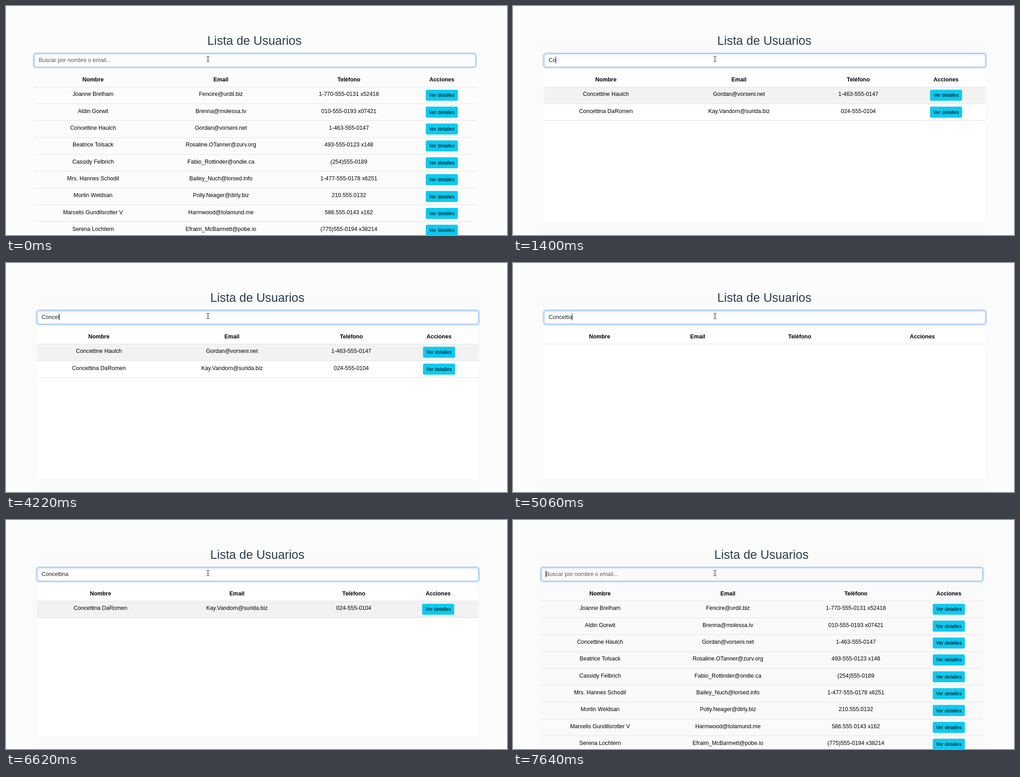
Write an HTML page that moves like this. It is 1105 px wide and 507 px high and loops after 8 s.

```html
<!DOCTYPE html>
<html lang="es">
<head>
<meta charset="utf-8">
<title>Lista de Usuarios</title>
<style>
  html, body { margin: 0; width: 100%; height: 100%; overflow: hidden; background: #fcfcfc; }
  svg { display: block; }
  text { font: 12.4px "Liberation Sans", Arial, sans-serif; white-space: pre; }
  .mid { text-anchor: middle; }
  .title { font-size: 26.9px; fill: #2c3e50; }
  .head { font-weight: bold; }
  .action { font-size: 10.85px; }
</style>
</head>
<body>
<svg id="stage" width="1105" height="507"></svg>
<script>
const LOOP = 8000;
const TABLE_WIDTH = 974;
const ROW_HEIGHT = 37.37;
const TABLE_TOP = 179;
const PLACEHOLDER = 'Buscar por nombre o email...';
const HEADERS = ['Nombre', 'Email', 'Teléfono', 'Acciones'];

const USERS = [
  ['Joanne Brelham', 'Fencire@urdil.biz', '1-770-555-0131 x52418'],
  ['Aldin Gorwit', 'Brenna@molessa.tv', '010-555-0193 x07421'],
  ['Concettine Haulch', 'Gordan@vorseni.net', '1-463-555-0147'],
  ['Beatrice Tolsack', 'Rosaline.OTanner@zurv.org', '493-555-0123 x148'],
  ['Cassidy Felbrich', 'Fabio_Rottinder@ondie.ca', '(254)555-0189'],
  ['Mrs. Hannes Schodil', 'Bailey_Nuch@lorsed.info', '1-477-555-0178 x6251'],
  ['Mortin Weldsan', 'Polly.Neager@dirly.biz', '210.555.0132'],
  ['Marcelis Gundilsrotter V', 'Harmwood@tolamund.me', '586.555.0143 x162'],
  ['Serena Lochtern', 'Efraim_McBarmett@pobe.io', '(775)555-0194 x38214'],
  ['Concettina DaRomen', 'Kay.Vandorn@surida.biz', '024-555-0104'],
];

// Column widths for 0, 1, 2 and many visible rows
const COLUMNS = [
  [245, 188, 262, 279],
  [280, 322, 193.5, 178.5],
  [273, 314, 212.5, 174.5],
  [260, 304, 260.5, 149.5],
];

// Start time, query, caret visible, query selected
const STEPS = [
  [0, '', false],
  [550, 'C', true],
  [1130, 'C', false],
  [1400, 'Co', true],
  [1520, 'Con', true],
  [1790, 'Conc', true],
  [2240, 'Conce', true],
  [2700, 'Conce', false],
  [3280, 'Conce', true],
  [3790, 'Conce', false],
  [4220, 'Concet', true],
  [4370, 'Concett', true],
  [4495, 'Concetti', true],
  [4620, 'Concettian', true],
  [5060, 'Concettia', true],
  [5200, 'Concetti', true],
  [5490, 'Concettin', true],
  [5620, 'Concettina', true],
  [6040, 'Concettina ', true],
  [6620, 'Concettina ', false],
  [7060, 'Concettina ', true],
  [7490, 'Concettina ', false, true],
  [7640, '', true],
];

const stage = document.getElementById('stage');

const rect = (x, y, w, h, fill, extra = '') =>
  `<rect x="${x}" y="${y}" width="${w}" height="${h}" fill="${fill}" ${extra}/>`;
const label = (x, y, text, kind = '') =>
  `<text class="mid ${kind}" x="${x}" y="${y}">${text}</text>`;

function centers(left, widths) {
  return widths.map(width => {
    left += width;
    return left - width / 2;
  });
}

function tableRow(user, i, left, xs, striped) {
  const top = TABLE_TOP + i * ROW_HEIGHT;
  const lineY = Math.floor(top);
  const nextLineY = Math.floor(top + ROW_HEIGHT);
  const stripe = striped && i % 2 === 0
    ? rect(left, lineY + 1, TABLE_WIDTH, nextLineY - lineY - 1, '#f2f2f2') : '';
  return stripe
    + rect(left, nextLineY, TABLE_WIDTH, 1, '#dee2e6')
    + user.map((text, c) => label(xs[c], Math.round(top + 20.2), text)).join('')
    + rect(xs[3] - 35.4, top + 6.4, 70.8, 24.4, '#0dcaf0', 'rx="3"')
    + label(xs[3], Math.round(top + 22.3), 'Ver detalles', 'action');
}

function inputBox(left, query, selected) {
  const x = left + 10.2;
  const fill = selected ? '#fff' : query ? '#212529' : '#595c5f';
  return rect(left - 1.2, 104.3, TABLE_WIDTH + 2.4, 32.2, 'none', 'rx="6" stroke="#c2dbfe" stroke-width="3.2"')
    + rect(left + .5, 106, TABLE_WIDTH - 1, 29, 'none', 'rx="4.5" stroke="#86b7fe"')
    + '<rect id="mark"/>'
    + `<text id="query" x="${x}" y="124" fill="${fill}">${query || PLACEHOLDER}</text>`;
}

function placeMark(left, query, selected) {
  const x = left + 10.2;
  const end = query ? x + document.getElementById('query').getComputedTextLength() : x;
  const [markX, y, w, h, fill] = selected
    ? [Math.floor(x), 111, Math.round(end - x), 19, '#3367d1']
    : [Math.floor(end), 112, 1, 15, '#111'];
  document.getElementById('mark').outerHTML = rect(markX, y, w, h, fill);
}

function render([start, query, caret, selected]) {
  const left = query ? 68.4 : 62;
  const needle = query.toLowerCase();
  const rows = USERS.filter(([name, email]) => `${name}\n${email}`.toLowerCase().includes(needle));
  const narrowed = rows.length < 3;
  const xs = centers(left, COLUMNS[Math.min(rows.length, 3)]);

  stage.innerHTML =
    (start ? rect(59, 67, 987, 440, '#fafafa') : '')
    + (narrowed ? rect(68, 112, 974, 366, '#fff') : '')
    + label(left + 486, 86, 'Lista de Usuarios', 'title')
    + inputBox(left, query, selected)
    + HEADERS.map((text, c) => label(xs[c], 167, text, 'head')).join('')
    + rect(left, TABLE_TOP, TABLE_WIDTH, 1, '#dee2e6')
    + rows.map((user, i) => tableRow(user, i, left, xs, narrowed)).join('')
    + '<path d="M442.5 111.5h2l1 1l1-1h2M445.5 112v11M442.5 123.5h2l1-1l1 1h2" fill="none" stroke="#000"/>';
  if (caret || selected) placeMark(left, query, selected);
}

let shown;
function tick() {
  const time = performance.now() % LOOP;
  const step = STEPS.findLast(([start]) => start <= time);
  if (step !== shown) render(shown = step);
  requestAnimationFrame(tick);
}
tick();
</script>
</body>
</html>
```
